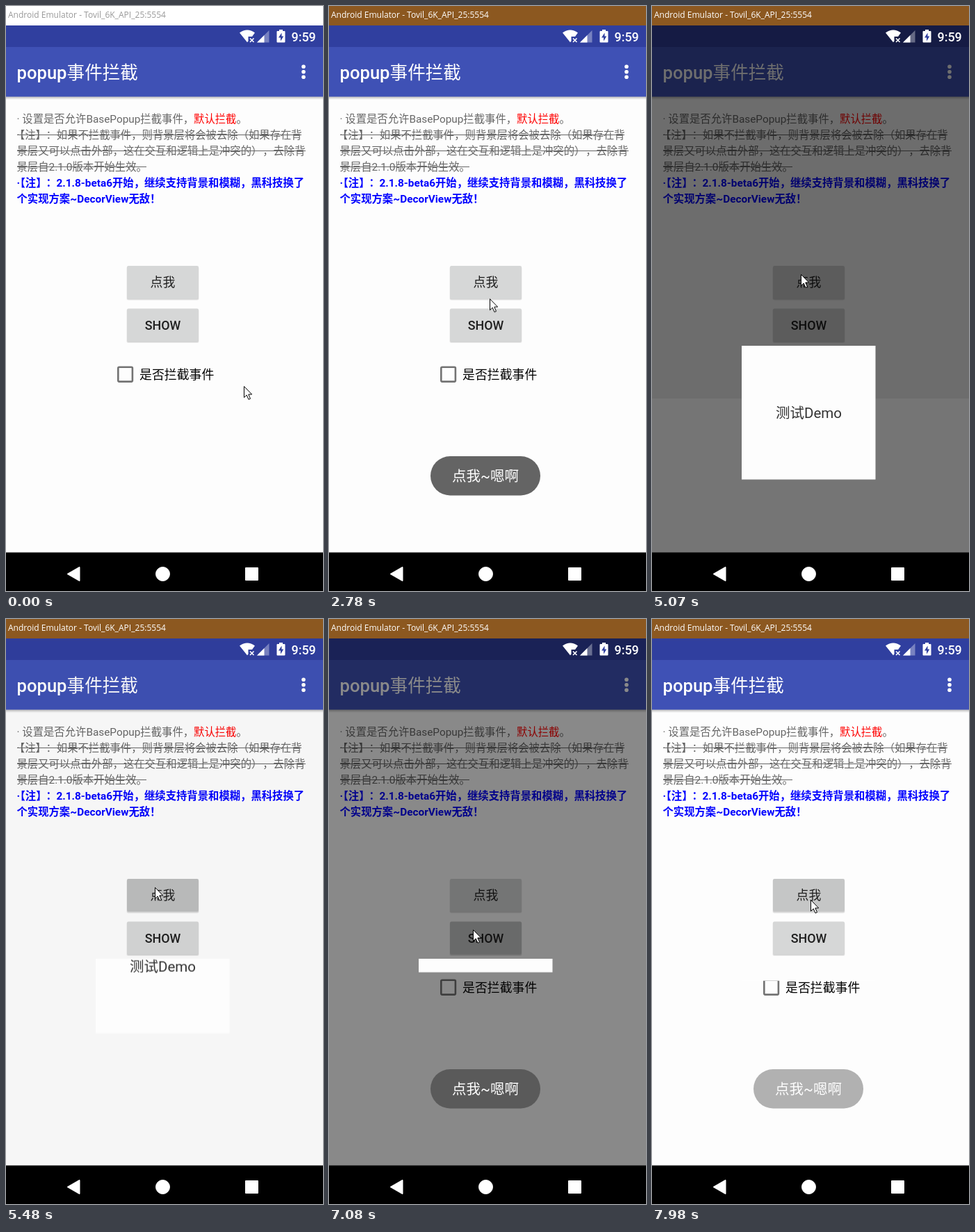
These frames come from a looping animation (456 by 842 pixels, 8 s). An HTML page:

```html
<!DOCTYPE html>
<html lang="zh-CN">
<head>
<meta charset="utf-8">
<title>popup事件拦截</title>
<style>
html, body { margin: 0; width: 100%; height: 100%; overflow: hidden; background: #fdfdfd; }
svg { display: block; width: 100vw; height: 100vh; font-family: Roboto, "Noto Sans CJK SC", "Noto Sans CJK", sans-serif; }
text { white-space: pre; }
.mid { text-anchor: middle; }
.body { font-size: 15.35px; fill: #666; }
.strike { stroke: #666; stroke-width: 1.1; }
.note { font-size: 15.35px; font-weight: 700; fill: #00f; }
.label { font-size: 17.9px; }
.large { font-size: 20.5px; }
.medium { font-weight: 500; }
.window-title { font: 12px "Open Sans", "Noto Sans", sans-serif; }

/* One loop is 8 s, so 1% is 80 ms. */
.anim { animation: 8s linear infinite; }
.caption-on { animation-name: focus; }
.dim { animation-name: dim; }
.strip { animation-name: strip; }
.popup { animation-name: slide; }
.toast { animation-name: toast; }
.press-tap { animation-name: press-tap; }
.press-show { animation-name: press-show; }
.cursor { animation-name: cursor; }

@keyframes focus {
  0%, 13.49% { opacity: 0; }
  13.5%, 100% { opacity: 1; }
}
@keyframes dim {
  0%, 49.41%, 69.25%, 85.91%, 99.1%, 100% { opacity: 0; animation-timing-function: cubic-bezier(.333, .667, .667, 1); }
  54.04%, 66%, 90.54%, 95.87% { opacity: .57; animation-timing-function: cubic-bezier(.333, .667, .667, 1); }
}
@keyframes strip {
  0%, 54.03%, 66%, 100% { opacity: 0; }
  54.04%, 65.99% { opacity: .055; }
}
@keyframes slide {
  0%, 50.92%, 71.4%, 87.46% { transform: translateY(-192px); animation-timing-function: cubic-bezier(.37, 0, .63, 1); }
  56.11%, 66%, 92.6% { transform: none; animation-timing-function: cubic-bezier(.37, 0, .63, 1); }
  95.87% { transform: none; animation-timing-function: cubic-bezier(.4, 0, .8, .8); }
  100% { transform: translateY(-172px); }
}
@keyframes toast {
  0%, 15.1%, 44.4%, 68.7%, 95.4%, 98.3% { opacity: 0; }
  18.9%, 40.5%, 72.5%, 91.5% { opacity: 1; }
  100% { opacity: .58; }
}
@keyframes press-tap {
  0%, 13.5%, 18.9%, 66%, 73.1%, 95.75% { opacity: 0; }
  15%, 16%, 67.5%, 69.5% { opacity: .11; }
  99%, 100% { opacity: .075; }
}
@keyframes press-show {
  0%, 49.4%, 58%, 85.5%, 94%, 100% { opacity: 0; }
  51%, 53%, 87%, 89% { opacity: .09; }
}
@keyframes cursor {
  0%, .375% { transform: translate(342px, 547px); }
  4.25%, 8.875% { transform: translate(366px, 423px); }
  12.875%, 34.74% { transform: translate(231px, 411px); }
  34.75% { transform: translate(231px, 421px); }
  37.875%, 56% { transform: translate(218px, 461px); }
  59%, 60.875% { transform: translate(214px, 415px); }
  63.375%, 76.875% { transform: translate(214px, 386px); }
  80.25%, 82.125% { transform: translate(201px, 449px); }
  82.5%, 85.5% { transform: translate(199px, 456px); }
  86%, 92.625% { transform: translate(207px, 447px); }
  95.25%, 100% { transform: translate(228px, 404px); }
}
</style>
</head>
<body>
<svg viewBox="0 0 456 842">
  <defs>
    <linearGradient id="shade" x2="0" y2="1">
      <stop stop-opacity=".28"/>
      <stop offset="1" stop-opacity="0"/>
    </linearGradient>
    <clipPath id="below-anchor"><rect y="489" width="456" height="298"/></clipPath>
    <g id="button">
      <rect x="173.5" y="1" width="104" height="48.5" rx="2.5" opacity=".08"/>
      <rect x="174" y="1" width="103" height="47.5" rx="2" opacity=".09"/>
      <rect x="174" width="103" height="47" rx="2" fill="#d6d7d7"/>
    </g>
    <rect id="press" x="174" width="103" height="47" rx="2"/>
  </defs>

  <!-- Window caption -->
  <rect width="456" height="28" fill="#fff"/>
  <text class="window-title" x="3" y="17" fill="#999">Android Emulator - Tovil_6K_API_25:5554</text>
  <g class="anim caption-on">
    <rect width="456" height="28" fill="#8c5820"/>
    <text class="window-title" x="3" y="17" fill="#fff">Android Emulator - Tovil_6K_API_25:5554</text>
  </g>

  <!-- App -->
  <rect y="28" width="456" height="759" fill="#fdfdfd"/>
  <rect y="130" width="456" height="5" fill="url(#shade)"/>
  <rect y="28" width="456" height="31" fill="#303f9f"/>
  <rect y="59" width="456" height="71.5" fill="#3f51b5"/>
  <text class="medium" x="15.5" y="105" font-size="25.6" fill="#fff">popup<tspan font-weight="400">事件拦截</tspan></text>
  <g fill="#fff">
    <circle cx="428" cy="87.3" r="2.8"/>
    <circle cx="428" cy="94.8" r="2.8"/>
    <circle cx="428" cy="102.3" r="2.8"/>
  </g>

  <g class="body">
    <text x="15.5" y="168">· 设置是否允许BasePopup拦截事件，<tspan fill="#f00">默认拦截</tspan>。</text>
    <text x="15.5" y="191">·【注】<tspan x="57.5">：</tspan><tspan x="72.8">如果不拦截事件，则背景层将会被去除（如果存在背</tspan></text>
    <text x="15.5" y="214">景层又可以点击外部，这在交互和逻辑上是冲突的）<tspan x="369.2">，</tspan><tspan x="384.5">去除背</tspan></text>
    <text x="15.5" y="237">景层自2.1.0版本开始生效。</text>
  </g>
  <path class="strike" d="M16 185.5H425M16 208.5H431M16 231.5H202"/>
  <g class="note">
    <text x="15.5" y="260">·【注】<tspan x="57.5">：</tspan><tspan x="72.5">2.1.8-beta6开始，继续支持背景和模糊，黑科技换了</tspan></text>
    <text x="15.5" y="283">个实现方案~DecorView无敌！</text>
  </g>

  <use href="#button" y="374"/>
  <use href="#button" y="435.5"/>
  <g class="anim press-tap"><use href="#press" y="374"/></g>
  <g class="anim press-show"><use href="#press" y="435.5"/></g>
  <g class="label mid" fill="#1f1f1f">
    <text x="225.5" y="404">点我</text>
    <text class="medium" x="225.5" y="465.5">SHOW</text>
  </g>
  <rect x="161.3" y="519.8" width="20.6" height="20.8" rx="1.5" fill="none" stroke="#737373" stroke-width="2.6"/>
  <text class="label" x="192" y="537">是否拦截事件</text>

  <!-- Popup -->
  <rect class="anim dim" y="28" width="456" height="759"/>
  <rect class="anim strip" y="565" width="456" height="222" fill="#fff"/>
  <g clip-path="url(#below-anchor)">
    <g class="anim popup">
      <rect x="129" y="489" width="192.5" height="192.5" fill="#fdfdfd"/>
      <text class="large mid" x="225.5" y="593" fill="#333">测试Demo</text>
    </g>
  </g>

  <g class="anim toast">
    <rect x="146" y="648" width="158" height="56.5" rx="28.2" fill="#565656" fill-opacity=".915"/>
    <text class="large mid" x="225" y="684" fill="#fff">点我~嗯啊</text>
  </g>

  <!-- Status icons -->
  <g fill="#fff">
    <path d="M336 38.5Q347 30.5 358 38.5L354 44H348.5V50.5L347 52.3Z"/>
    <path d="M351 46.5L356.5 52M356.5 46.5L351 52" stroke="#fff" stroke-width="1.6"/>
    <path d="M361 52.5L378.5 35V52.5Z" opacity=".35"/>
    <path d="M361 52.5L371.5 42V52.5Z"/>
    <path d="M393 36V34H398V36H400.5Q401.5 36 401.5 37V51.5Q401.5 52.5 400.5 52.5H390.5Q389.5 52.5 389.5 51.5V37Q389.5 36 390.5 36Z"/>
    <path d="M396.5 38.5L392 45.5H395V50.5L399.3 43.5H396.5Z" fill="#303f9f"/>
    <text class="label medium" x="410.5" y="50.5">9:59</text>
  </g>

  <!-- Navigation bar -->
  <rect y="786.5" width="456" height="56"/>
  <g fill="#fff" stroke="#fff" stroke-linejoin="round">
    <path d="M89 817.5L105.5 808V827Z" stroke-width="2"/>
    <circle cx="225.5" cy="817.5" r="10" stroke-width="1"/>
    <rect x="345" y="809" width="17" height="17" stroke-width="2"/>
  </g>

  <path class="anim cursor" d="M.5 .5V16.5L4.2 13L7 19.3L9.5 18.2L6.8 12H11.7Z" fill="#fff" stroke="#000"/>
</svg>
</body>
</html>
```
